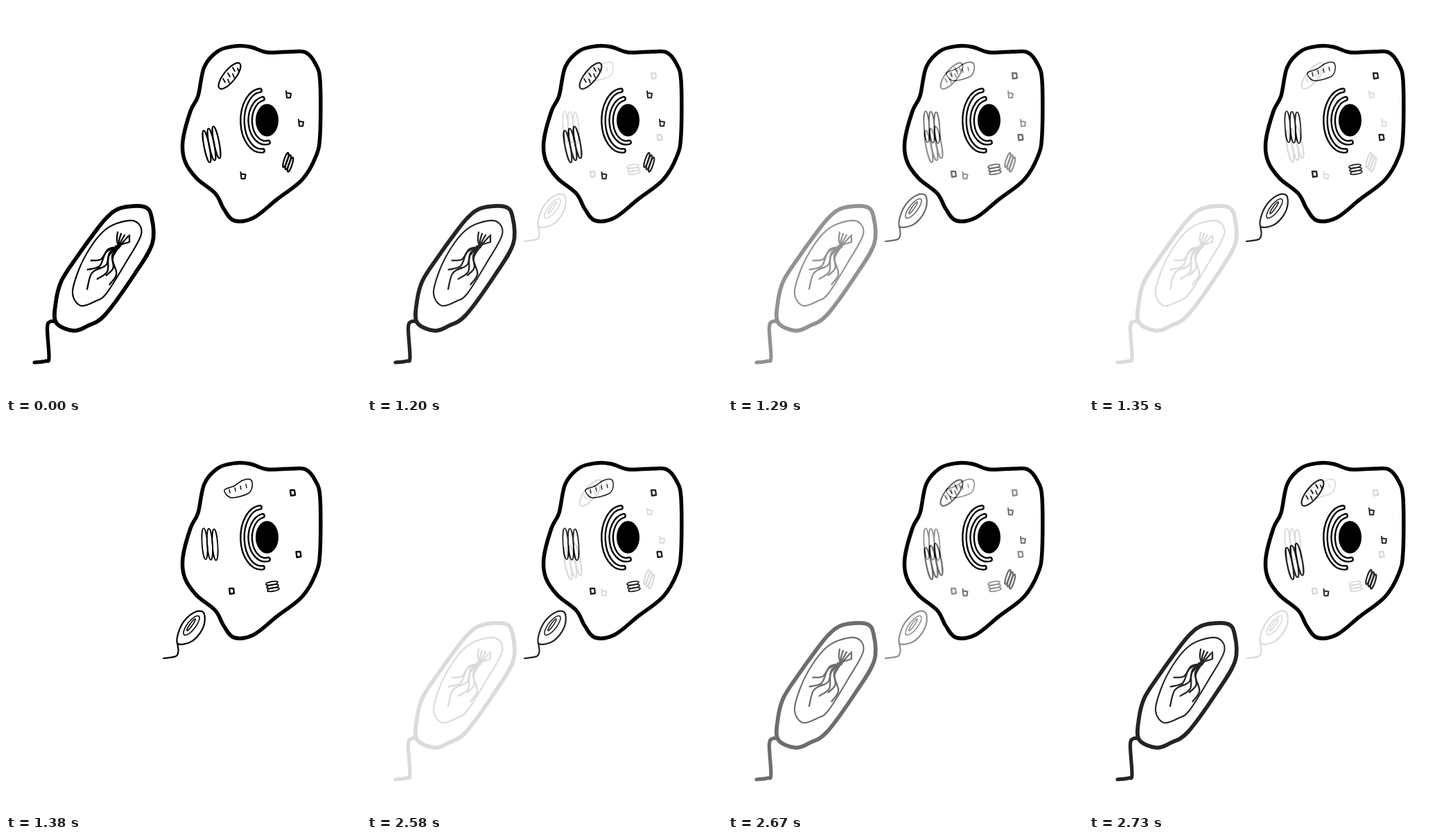
Recreate the animation shown at these times as an HTML page. Size 512 by 562 pixels, loop 2.76 s.

```html
<!DOCTYPE html>
<html lang="en">
<head>
<meta charset="utf-8">
<title>Cell and bacterium</title>
<style>
  html, body { margin: 0; height: 100%; overflow: hidden; background: #fff; }
  svg { display: block; width: 100%; height: 100%; }
  g { fill: none; stroke: #000; stroke-linecap: round; stroke-linejoin: round; }
</style>
</head>
<body>
<svg viewBox="0 0 512 562">
  <g id="large"></g>
  <g id="small"><rect width="512" height="562" fill="#fff" stroke="none"/></g>
  <g id="cell"></g>
</svg>
<script>
const [large, small, cell] = ['large', 'small', 'cell'].map(id => document.getElementById(id));

function add(parent, tag, attributes) {
  const node = document.createElementNS('http://www.w3.org/2000/svg', tag);
  for (const name in attributes) node.setAttribute(name, attributes[name]);
  parent.append(node);
}
const path = (parent, width, d, stroke = '#000') =>
  add(parent, 'path', { d, stroke, 'stroke-width': width });

// Smooth pen line (Catmull-Rom) through "x,y x,y ..."
function pen(parent, width, text, closed = false) {
  const points = text.split(' ').map(pair => pair.split(',').map(Number));
  const n = points.length;
  const at = i => points[closed ? (i + n) % n : Math.max(0, Math.min(n - 1, i))];
  let d = 'M' + points[0];
  for (let i = 0; i < (closed ? n : n - 1); i++) {
    const [a, b, c, e] = [at(i - 1), at(i), at(i + 1), at(i + 2)];
    const c1 = b.map((v, k) => v + (c[k] - a[k]) / 6);
    const c2 = c.map((v, k) => v - (e[k] - b[k]) / 6);
    d += `C${c1} ${c2} ${c}`;
  }
  path(parent, width, d + (closed ? 'Z' : ''));
}
const loop = (parent, width, text) => pen(parent, width, text, true);

// Thin ellipse stretched between two end points
function sac(parent, width, radius, x1, y1, x2, y2) {
  const cx = (x1 + x2) / 2, cy = (y1 + y2) / 2, dx = x2 - x1, dy = y2 - y1;
  add(parent, 'ellipse', {
    cx, cy, rx: Math.hypot(dx, dy) / 2, ry: radius, 'stroke-width': width,
    transform: `rotate(${Math.atan2(dy, dx) * 180 / Math.PI} ${cx} ${cy})`
  });
}
function stack(parent, width, radius, [x1, y1, x2, y2], [dx, dy]) {
  for (let i = 0; i < 3; i++)
    sac(parent, width, radius, x1 + i * dx, y1 + i * dy, x2 + i * dx, y2 + i * dy);
}

// Hollow band: a black arc with a narrower white one on top
function band(rx, ry, from, to) {
  const d = `M${from}A${rx} ${ry} 0 0 0 ${to}`;
  path(cell, 7.8, d);
  path(cell, 3, d, '#fff');
}

// Shared cell
loop(cell, 5.5, '306,65 330,58 352,59 377,67 411,66 432,67 446,83 453,108 453,185 447,217 427,251 390,280 357,306 329,310 314,293 302,271 275,249 258,224 255,195 266,152 277,130 286,88');
band(27, 43.6, '366,122', '370,209');
band(21.5, 31.6, '370,134', '378,197');
add(cell, 'ellipse', { cx: 376.5, cy: 165, rx: 16.5, ry: 23.5, fill: '#000', stroke: 'none' });

// Large bacterium
loop(large, 5.7, '165,292 199,290 210,305 211,343 185,388 143,446 118,462 97,469 72,457 72,427 80,397 102,363 125,331 145,306');
pen(large, 5.2, '72,456 64,456 59.5,465 62,508 57,513 41,515');
loop(large, 2.1, '186,311 195,330 172,372 145,415 130,426 108,433 96,415 105,381 121,350 140,326 160,314');

// DNA: strands gathered in a knot, fanning out below it
for (let i = 0; i < 4; i++)
  pen(large, 2.3, `${161 + 5 * i},${327 + 2 * i} ${160 + 3 * i},${338 + i} 163,349`);
path(large, 2.3, 'M178 331v10l-20 6');
for (let i = 0; i < 6; i++) {
  const angle = (154 - 10 * i) * Math.PI / 180, length = i % 2 ? 56 : 45;
  const along = (part, turn) =>
    [163 + length * part * Math.cos(angle + turn), 348 + length * part * Math.sin(angle + turn)];
  pen(large, 2.3, `163,348 ${along(.35, .25)} ${along(.7, -.15)} ${along(1, 0)}`);
}
pen(large, 2.3, '136,378 123,387 117,409');

// Organelles next to the large bacterium
sac(large, 2.2, 8.5, 308, 119, 337, 83);
for (let i = 0; i < 3; i++)
  path(large, 1.8, `M${313 + 7 * i} ${105 - 8 * i}l3 5m4 -4l2 5`);
stack(large, 2.2, 3.8, [285, 180, 294, 226], [7, -3]);
stack(large, 2.2, 2.4, [407, 212, 400, 233], [3.3, 3.3]);
for (const at of ['404 123', '422 164', '338.5 240'])
  path(large, 2, `M${at}l1 9.5 5 0 1 -6 -6.5 -1`);

// Small bacterium
loop(small, 2.2, '273,273 285,274 286,290 278,306 265,317 248,319 248,305 257,286');
pen(small, 2.2, '247,318 248.5,329 245,337 227,340');
sac(small, 1.6, 6, 257, 306, 278, 279);
sac(small, 1.6, 1.8, 261, 300, 273, 283);

// Organelles next to the small bacterium
loop(small, 1.5, '353,82 355,92 349,102 325,108 315,97 329,91 341,83');
for (let i = 0; i < 4; i++) path(small, 1.3, `M${322 + 8 * i} ${96 - 2.5 * i}l1 5`);
stack(small, 1.7, 3.8, [285, 152, 288, 197], [7.5, .7]);
stack(small, 1.7, 2.5, [375, 233, 392, 230], [1, 4.5]);
for (const at of ['410 97', '418.5 186', '322 239'])
  path(small, 2.3, `M${at}l6 0 1 7 -6 1z`);

// Hold 1200 ms, then cross-fade in steps of one seventh every 30 ms
const fade = elapsed => Math.max(0, Math.min(7, Math.floor(elapsed / 30) + 1)) / 7;

function draw() {
  const t = performance.now() % 2760;
  small.setAttribute('opacity', t < 2580 ? fade(t - 1200) : 1 - fade(t - 2580));
  requestAnimationFrame(draw);
}
draw();
</script>
</body>
</html>
```
